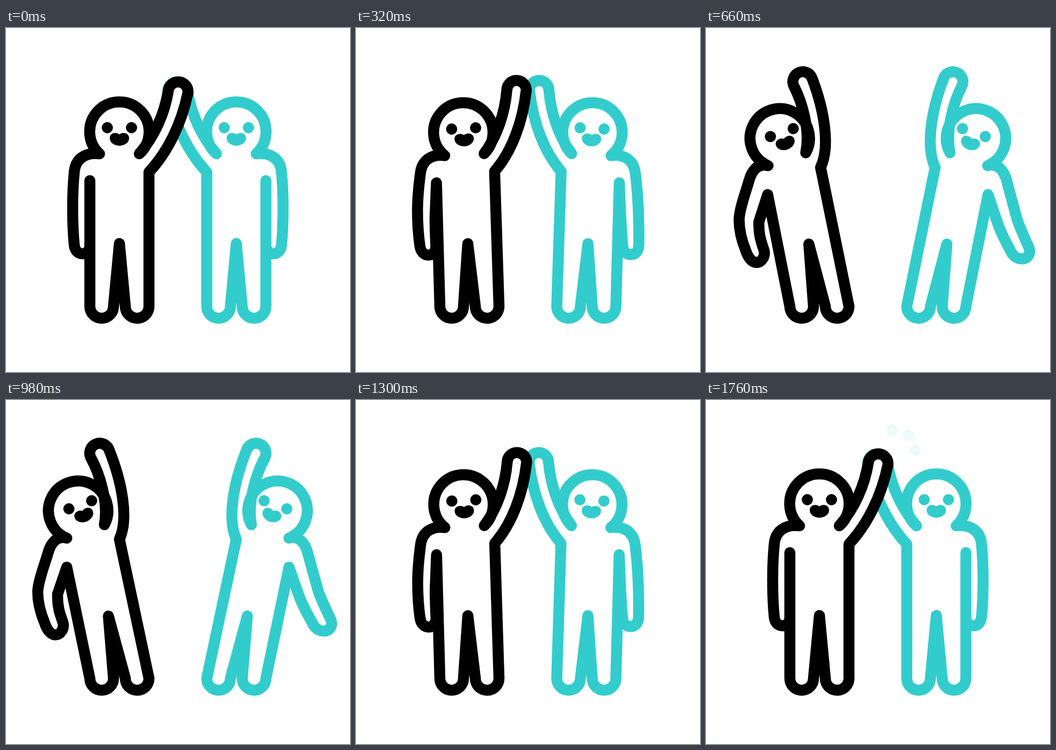
Write an HTML page that moves like this. It is 640x640 px and loops after 2.4 s.

```html
<!DOCTYPE html>
<html lang="en">
<head>
<meta charset="utf-8">
<title>High five</title>
<style>
  html, body { margin: 0; width: 100%; height: 100%; overflow: hidden; background: #fff; }
  svg { display: block; width: 100vw; height: 100vh; }
  .outline { fill: #fff; stroke: currentColor; stroke-width: 20.5; stroke-linejoin: round; }
  .face, .sparks { fill: currentColor; }
</style>
</head>
<body>
<svg viewBox="0 0 640 640">
  <g id="teal" color="#33cccc" transform="translate(639.5 0) scale(-1 1)"></g>
  <g id="black" color="#000"></g>
  <g id="sparks" class="sparks" color="#33cccc">
    <circle cx="346.5" cy="56" r="10.8"/>
    <circle cx="376.5" cy="65" r="10.8"/>
    <circle cx="389" cy="93.7" r="10.8"/>
  </g>
</svg>
<script>
const LOOP = 2400, STEP = 20, LAST = 1760;
const LEAN_END = 879, CLAP_END = 1526;

// Lowered arm, from the neck around the hand to the armpit.
const ARM_UPRIGHT =
  "M174 234C148 231 129 243 127 268C125 288 124 310 124 335C124 360 125 384 127 404" +
  "C128 414 134 420 142 420C150 420 156 414 156 404C156 390 156 370 156 350L156 284";
const ARM_BENT =
  "M113 257C97 252 84 263 78 285C71 309 60 336 59 357C59 377 64 396 72 415" +
  "C76 427 83 437 92 437C101 437 109 426 106 414C101 400 95 385 96 361L113 311";
const ARM_SWUNG =
  "M113 257C97 252 84 263 78 285C72 307 65 333 58 357C52 374 42 394 35 409" +
  "C31 420 37 430 48 430C57 430 66 424 70 414C78 399 88 382 94 365L113 311";

// Legs, raised arm and head, back to the neck.
const BODY_UPRIGHT =
  "L156 518A1 1 0 0 0 200 518L211 401L222 518A1 1 0 0 0 266 518L266 268" +
  "C300 232 326 180 338.5 120.5A1 1 0 0 0 302 116.5C295 160 276 202 248 234" +
  "A55.3 55.3 0 1 0 174 234Z";
const BODY_LEANING =
  "L156 518A1 1 0 0 0 200 518L190.5 402L222 518A1 1 0 0 0 266 518L211 259" +
  "C228 222 217 155 191 91A1 1 0 0 0 157.5 107C174 137 191 190 183 232" +
  "A55.3 55.3 0 1 0 113 257Z";

const MOUTH = "M0-8C-6-13-18-11-18-1C-18 8-8 13 0 13C8 13 18 8 18-1C18-11 6-13 0-8Z";

const clamp = v => Math.max(0, Math.min(1, v));
const lerp = (a, b, p) => a + (b - a) * p;

// Blends two strings of the same structure, number by number.
function blend(from, to, p) {
  const ends = to.match(/-?[\d.]+/g);
  let i = 0;
  return from.replace(/-?[\d.]+/g, n => +lerp(+n, +ends[i++], p).toFixed(3));
}

function ease(x) {
  let lo = 0, hi = 1;
  for (let i = 0; i < 30; i++) {
    const s = (lo + hi) / 2, r = 1 - s;
    const bx = 3 * 0.76 * s * r * r + 3 * 0.26 * s * s * r + s ** 3;
    if (bx < x) lo = s; else hi = s;
  }
  return lo * lo * (3 - 2 * lo);
}

function figure(id, swungArm) {
  const group = document.getElementById(id);
  const add = (tag, cls, attrs = {}) => {
    const el = document.createElementNS("http://www.w3.org/2000/svg", tag);
    el.setAttribute("class", cls);
    for (const key in attrs) el.setAttribute(key, attrs[key]);
    return group.appendChild(el);
  };
  const outline = add("path", "outline");
  const eyes = [add("circle", "face", { r: 10.4 }), add("circle", "face", { r: 10.4 })];
  const mouth = add("path", "face", { d: MOUTH });

  const placeEye = (eye, x0, y0, x1, y1, p) => {
    eye.setAttribute("cx", lerp(x0, x1, p));
    eye.setAttribute("cy", lerp(y0, y1, p));
  };
  return p => {
    outline.setAttribute("d", blend(ARM_UPRIGHT, swungArm, p) + blend(BODY_UPRIGHT, BODY_LEANING, p));
    placeEye(eyes[0], 188.5, 185.5, 117, 202.5, p);
    placeEye(eyes[1], 233.5, 185.5, 159.3, 187.3, p);
    mouth.setAttribute("transform", blend("translate(211 206) rotate(0)", "translate(145 214) rotate(-20)", p));
  };
}

const poseTeal = figure("teal", ARM_SWUNG);
const poseBlack = figure("black", ARM_BENT);
const sparks = document.getElementById("sparks");

function draw(time) {
  const t = Math.min(LAST, Math.floor(time % LOOP / STEP) * STEP);
  const lean = t < LEAN_END
    ? ease(t / LEAN_END)
    : 1 - ease(clamp((t - LEAN_END) / (CLAP_END - LEAN_END)));
  poseTeal(lean * 1.017);
  poseBlack(lean * 1.017);
  sparks.setAttribute("opacity", Math.min(clamp((t - 1400) / 60), clamp((1780 - t) / 240)));
}

const start = performance.now();
function tick() {
  draw(performance.now() - start);
  requestAnimationFrame(tick);
}
tick();
</script>
</body>
</html>
```
